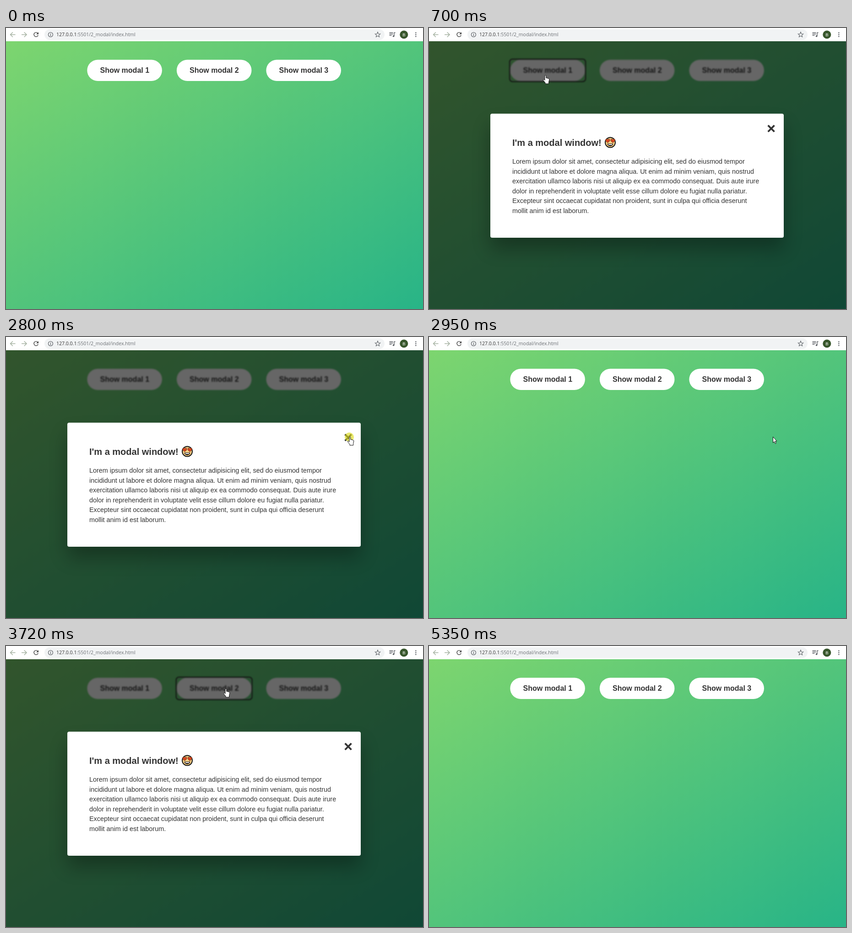
These frames come from a looping animation (911 by 615 pixels, 5.52 s). An HTML page:

```html
<!DOCTYPE html>
<html lang="en">
<head>
<meta charset="utf-8">
<title>Modal window</title>
<style>
  html, body { margin: 0; width: 100%; height: 100%; overflow: hidden; background: #fff; }
  #page { position: absolute; top: 29px; left: 0; width: 911px; height: 586px;
    background: linear-gradient(to top left, #28b487, #7dd56f); }
  svg { position: absolute; top: 0; left: 0; }
  text { font-family: "Liberation Sans", Arial, sans-serif; fill: #333; }
  .bold { font-weight: bold; }
  .line { fill: none; stroke: #5f6368; stroke-width: 1.4; }
  .url { font: 10.5px "Open Sans", "Noto Sans", sans-serif; fill: #6b6f73; }
  .ring { fill: none; }
  .pointer { fill: #fff; stroke: #111; stroke-width: 1; stroke-linejoin: round; }
</style>
</head>
<body>
<div id="page"></div>
<svg width="911" height="615" viewBox="0 0 911 615">
  <defs>
    <filter id="blur" filterUnits="userSpaceOnUse" x="150" y="45" width="610" height="100" color-interpolation-filters="sRGB">
      <feGaussianBlur stdDeviation="1.8"/>
    </filter>
    <filter id="soft" filterUnits="userSpaceOnUse" x="60" y="130" width="790" height="440">
      <feGaussianBlur stdDeviation="20"/>
    </filter>
    <path id="heart" d="M0 4.6C-2.5 2.8-4.8.8-4.6-1.6C-4.3-4-1.2-4.3 0-2C1.2-4.3 4.3-4 4.6-1.6C4.8.8 2.5 2.8 0 4.6Z" fill="#d9481f" stroke="#3a1a10" stroke-width=".7"/>
  </defs>

  <g id="buttons"></g>

  <g id="modal">
    <rect y="29" width="911" height="586" opacity=".6"/>
    <rect x="134" y="212" width="641" height="271" rx="4" opacity=".3" filter="url(#soft)"/>
    <rect x="134" y="187.5" width="641" height="271.5" rx="4" fill="#fff"/>
    <path d="M740.7 213.2l13.8 13.8m0-13.8l-13.8 13.8" fill="none" stroke="#333" stroke-width="3.8"/>
    <text class="bold" x="182" y="257.5" font-size="20">I'm a modal window!</text>
    <g transform="translate(396 250.5)">
      <circle r="11" fill="#f4cd83" stroke="#151515" stroke-width="2"/>
      <use href="#heart" x="-5.6" y="-4"/>
      <use href="#heart" x="5.6" y="-4"/>
      <path d="M-6.3 2.5H6.3C6 10-6 10-6.3 2.5Z" fill="#1c1512"/>
      <path d="M-4.6 3.4H4.6L3.8 5.6H-3.8Z" fill="#fff"/>
    </g>
    <g id="copy" font-size="14.4"></g>
  </g>

  <g id="toolbar">
    <rect width="911" height="29" fill="#fff"/>
    <rect x="84" y="3" width="743" height="23" rx="11.5" fill="#f1f3f4"/>
    <path class="line" style="stroke:#a3b09f" d="M20.5 14.5H9.5m5.3-5.3l-5.3 5.3l5.3 5.3M34 14.5H45m-5.3-5.3l5.3 5.3l-5.3 5.3"/>
    <path class="line" style="stroke:#444" d="M69.6 11.6A4.7 4.7 0 1 0 70.2 15.8"/>
    <path d="M71 9v4.8h-4.8z" fill="#444"/>
    <circle class="line" style="stroke-width:1.2" cx="97.4" cy="14.5" r="5"/>
    <path class="line" d="M97.4 13.6v3.8m0-6.2v1.4"/>
    <text class="url" x="110" y="18.4"><tspan fill="#333">127.0.0.1</tspan>:5501/2_modal/index.html</text>
    <path id="star" class="line" style="stroke-width:1.1"/>
    <path class="line" d="M837.5 10.3h8m-8 3h8m-8 3h5M848 18V10.3h2.6"/>
    <circle cx="846.6" cy="17.8" r="1.9" fill="#5f6368"/>
    <circle cx="869.3" cy="14.5" r="9" fill="#38572c"/>
    <text x="869.3" y="17.9" font-size="9.5" text-anchor="middle" style="fill:#fff">B</text>
    <g fill="#5f6368"><circle cx="895.3" cy="10.5" r="1.3"/><circle cx="895.3" cy="14.5" r="1.3"/><circle cx="895.3" cy="18.5" r="1.3"/></g>
  </g>

  <g id="cursor">
    <circle id="press" cx="-1" cy="1" r="10" fill="#dcdc1e" opacity=".65"/>
    <path id="arrow" class="pointer" d="M.5.5V13.5L3.4 10.8L5.4 15.4L7.4 14.5L5.4 10H9Z"/>
    <path id="hand" class="pointer" d="M-1 2Q-1 .5.4.5T1.8 2V6.2L7 7.4Q9 8 8.8 10L7.6 15.5V19H0V16.8L-4.5 11.4Q-4.8 9-2.7 9.7L-1 11.4Z"/>
  </g>
</svg>
<script>
const LOOP = 5520, STEP = 75;
const $ = id => document.getElementById(id);
const show = (el, on) => el.style.display = on ? '' : 'none';

$('buttons').innerHTML = [1, 2, 3].map(n => {
  const x = 177.3 + (n - 1) * 195.55;
  return `<rect x="${x}" y="69.5" width="163.6" height="46.5" rx="23.25" fill="#fff"/>
    <g id="ring${n}" class="ring">
      <rect x="${x}" y="69.2" width="163.6" height="47" rx="5" stroke="#fff"/>
      <rect x="${x - 1}" y="68.2" width="165.6" height="49" rx="6" stroke="#101010" stroke-width="2"/>
    </g>
    <text class="bold" x="${x + 28.2}" y="98.3" font-size="16">Show modal ${n}</text>`;
}).join('');

$('copy').innerHTML = [
  'Lorem ipsum dolor sit amet, consectetur adipisicing elit, sed do eiusmod tempor',
  'incididunt ut labore et dolore magna aliqua. Ut enim ad minim veniam, quis nostrud',
  'exercitation ullamco laboris nisi ut aliquip ex ea commodo consequat. Duis aute irure',
  'dolor in reprehenderit in voluptate velit esse cillum dolore eu fugiat nulla pariatur.',
  'Excepteur sint occaecat cupidatat non proident, sunt in culpa qui officia deserunt',
  'mollit anim id est laborum.'
].map((s, i) => `<text x="182" y="${297 + i * 21.55}">${s}</text>`).join('');

$('star').setAttribute('d', 'M' + Array.from({ length: 10 }, (_, i) => {
  const r = i % 2 ? 2.6 : 6, a = i * Math.PI / 5;
  return `${812 + r * Math.sin(a)} ${14.8 - r * Math.cos(a)}`;
}).join('L') + 'Z');

// Pointer moves: start time, number of steps, end point
const moves = [
  [80, 6, 254, 103],
  [1250, 7, 632, 266], [1790, 1, 635, 260],
  [1870, 5, 725, 210], [2250, 3, 751, 226], [2800, 1, 751, 218],
  [3100, 8, 480, 93],
  [4270, 4, 725, 96],
  [5280, 1, 745, 98]
];
// Time spans in which each part is shown
const spans = {
  modal: [[700, 2950], [3720, 4960]],
  ring1: [[630, 2800]],
  ring2: [[3640, 4880]],
  ring3: [],
  press: [[630, 700], [2800, 2950], [3640, 3720], [4880, 4960]],
  hand: [[380, 1250], [2400, 2950], [3550, 4270], [4960, 5280]],
  cursor: [[80, 5350]]
};
const active = (name, t) => spans[name].some(([a, b]) => t >= a && t < b);

function pointerAt(t) {
  let x = 208.4, y = -8.6;
  for (const [start, steps, endX, endY] of moves) {
    if (t < start) break;
    const p = Math.min(1, (Math.floor((t - start) / STEP) + 1) / steps);
    x += (endX - x) * p;
    y += (endY - y) * p;
  }
  return [x, y];
}

function draw() {
  const t = performance.now() % LOOP;
  for (const name in spans) show($(name), active(name, t));
  show($('arrow'), !active('hand', t));
  $('buttons').setAttribute('filter', active('modal', t) ? 'url(#blur)' : 'none');
  $('cursor').setAttribute('transform', `translate(${pointerAt(t).map(Math.round)})`);
  requestAnimationFrame(draw);
}
draw();
</script>
</body>
</html>
```
